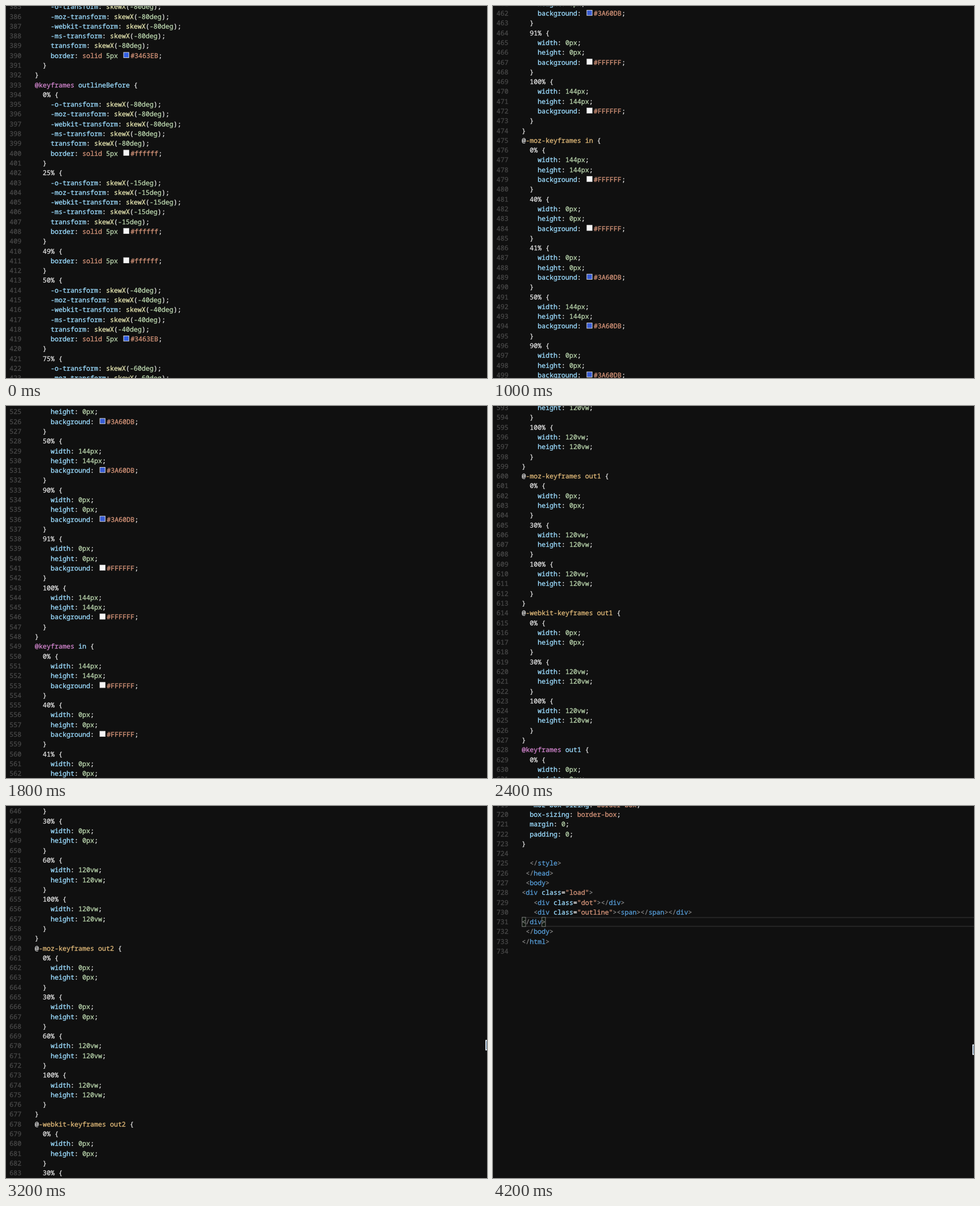
An HTML page that plays this animation: 851 by 658 pixels, repeating every 4300 ms.

```html
<!DOCTYPE html>
<html lang="en">
<head>
<meta charset="utf-8">
<title>Scrolling code</title>
<style>
  html, body { margin: 0; width: 100%; height: 100%; overflow: hidden; background: #101010; }
  svg { display: block; width: 851px; height: 658px; }
  text {
    font: 11.673px "Noto Sans Mono", "DejaVu Sans Mono", monospace;
    text-rendering: geometricPrecision;
    stroke-width: 0.32px;
  }
</style>
</head>
<body>
<svg id="stage" viewBox="0 0 851 658">
  <rect width="851" height="658" fill="#101010"/>
  <g id="code"></g>
  <g id="pointer">
    <path d="M849 -8.3H854V8.3H849Z" fill="#4a6a88" stroke="#e4ebf2" stroke-width="1.8"/>
  </g>
</svg>
<script>
const LINE = 17.29, CHAR = 7.004, LEFT = 51, NUM_LEFT = 6.2;
const FIRST = 385, FIRST_Y = 1.2, BASE = 4.1;
const NOTCH = 45.5, TICK = 100, LOOP = 4300;

const C = {
  fg: '#e0e0e0', num: '#b9d4ac', str: '#d6957a', prop: '#9cdcfe', fn: '#e4e4b0',
  at: '#d084cc', sel: '#dfb878', tag: '#569cd6', punct: '#808080', gutter: '#484848'
};

// Wheel notches scrolled at each tick
const NOTCHES = [
  0, 4, 0, 4, 0, 5, 4, 3, 3, 3, 3, 4, 4, 4, 4, 0, 4, 0, 4, 4, 4, 0,
  8, 0, 10, 0, 3, 4, 3, 3, 4, 0, 3, 3, 3, 3, 2, 3, 3, 3, 3, 3, 2
];

// ---- document: each line is { col, parts: [[kind, text], ...] }
const lines = [];
const add = (col, ...parts) => lines.push({ col, parts });

function scan(text, regex, kinds) {
  return [...text.matchAll(regex)].map(m => [kinds[m.slice(1).findIndex(Boolean)], m[0]]);
}
const value = text => scan(text,
  /(#\w+)|([a-zA-Z]+(?=\())|(-?\d+[a-z]*)|([a-z-]+)|(.)/g,
  ['hex', 'fn', 'num', 'str', 'fg']);
const html = (col, text) => add(col, ...scan(text,
  /(<\/?|>)|("[^"]*")|(\w+(?==))|(\w+)|(.)/g,
  ['punct', 'str', 'prop', 'tag', 'fg']));

const decl = (col, name, val) =>
  add(col, ['prop', name], ['fg', ': '], ...value(val), ['fg', ';']);
const close = col => add(col, ['fg', '}']);

function stop(percent, decls) {
  add(2, ['fg', percent + '% {']);
  decls.forEach(([name, val]) => decl(4, name, val));
  close(2);
}

function keyframes(prefix, name, stops) {
  if (prefix) add(0, ['fg', '@'], ['sel', `${prefix}keyframes ${name}`], ['fg', ' {']);
  else add(0, ['at', '@keyframes'], ['prop', ' ' + name], ['fg', ' {']);
  stops.forEach(s => stop(...s));
  close(0);
}
const allPrefixes = (name, stops) =>
  ['-o-', '-moz-', '-webkit-', ''].forEach(p => keyframes(p, name, stops));

const border = color => ['border', 'solid 5px ' + color];
const skew = (deg, color) => [
  ...['-o-', '-moz-', '-webkit-', '-ms-', ''].map(p => [p + 'transform', `skewX(-${deg}deg)`]),
  border(color)
];
const size = s => [['width', s], ['height', s]];
const box = (s, color) => [...size(s), ['background', color]];

const WHITE = '#ffffff', BLUE = '#3463EB', WHITE2 = '#FFFFFF', BLUE2 = '#3A60DB';

skew(80, BLUE).forEach(([name, val]) => decl(4, name, val));
close(2);
close(0);
keyframes('', 'outlineBefore', [
  [0, skew(80, WHITE)], [25, skew(15, WHITE)], [49, [border(WHITE)]],
  [50, skew(40, BLUE)], [75, skew(60, BLUE)], [100, skew(80, BLUE)]
]);
allPrefixes('in', [
  [0, box('144px', WHITE2)], [40, box('0px', WHITE2)], [41, box('0px', BLUE2)],
  [50, box('144px', BLUE2)], [90, box('0px', BLUE2)], [91, box('0px', WHITE2)],
  [100, box('144px', WHITE2)]
]);
allPrefixes('out1', [[0, size('0px')], [30, size('120vw')], [100, size('120vw')]]);
allPrefixes('out2', [
  [0, size('0px')], [30, size('0px')], [60, size('120vw')], [100, size('120vw')]
]);
add(0, ['sel', '*'], ['fg', ',']);
add(0, ['sel', '*:before'], ['fg', ',']);
add(0, ['sel', '*:after'], ['fg', ' {']);
['-o-', '-webkit-', '-moz-', ''].forEach(p => decl(2, p + 'box-sizing', 'border-box'));
decl(2, 'margin', '0');
decl(2, 'padding', '0');
close(0);
add(0);
html(2, '</style>');
html(1, '</head>');
html(1, '<body>');
html(0, '<div class="load">');
html(3, '<div class="dot"></div>');
html(3, '<div class="outline"><span></span></div>');
const current = lines.length;
html(0, '</div>');
html(1, '</body>');
html(0, '</html>');
add(0);

// ---- drawing
const code = document.getElementById('code');
const pointer = document.getElementById('pointer');

function el(parent, name, attrs, text) {
  const node = document.createElementNS('http://www.w3.org/2000/svg', name);
  for (const key in attrs) node.setAttribute(key, attrs[key]);
  if (text) node.textContent = text;
  return parent.appendChild(node);
}

const span = (row, x, color, text) =>
  el(row, 'tspan', { x, fill: color, stroke: color }, text);

function swatch(x, y, color) {
  el(code, 'rect', {
    x: x + 3, y: y - 5.6, width: 9.3, height: 9.3, opacity: 0.96,
    fill: color, stroke: '#eeeeee', 'stroke-width': 0.91
  });
}

function drawLine({ col, parts }, i) {
  const y = FIRST_Y + i * LINE;
  const row = el(code, 'text', { y: y + BASE });
  span(row, NUM_LEFT, C.gutter, String(FIRST + i));
  let x = LEFT + col * CHAR;
  for (const [kind, text] of parts) {
    if (kind === 'hex') {
      swatch(x, y, text);
      x += 15.3;
    }
    const word = text.trimStart();
    const start = x + (text.length - word.length) * CHAR;
    if (word) span(row, start, C[kind] || C.str, word.trimEnd());
    x += text.length * CHAR;
  }
}

function drawCurrentLine() {
  const top = FIRST_Y + current * LINE - LINE / 2;
  const edge = { x: LEFT, width: 800, height: 1.8, fill: '#282828' };
  el(code, 'rect', { ...edge, y: top });
  el(code, 'rect', { ...edge, y: top + LINE - 1.8 });
  for (const col of [0, 5]) {
    el(code, 'rect', {
      x: LEFT + col * CHAR + 0.4, y: top + 0.5, width: CHAR - 0.6, height: LINE - 1,
      fill: '#0f180f', stroke: '#888888', 'stroke-width': 0.91
    });
  }
}

drawCurrentLine();
lines.forEach(drawLine);

function render(time) {
  const tick = Math.floor((time % LOOP) / TICK);
  const done = NOTCHES.slice(0, tick + 1).reduce((a, b) => a + b, 0);
  code.setAttribute('transform', `translate(0 ${-done * NOTCH})`);
  const py = 423 + 8 * Math.max(0, done - 99) / 28;
  pointer.setAttribute('transform', `translate(0 ${py})`);
  pointer.setAttribute('visibility', done > 88 ? 'visible' : 'hidden');
}

function loop() {
  render(performance.now());
  requestAnimationFrame(loop);
}
loop();
</script>
</body>
</html>
```
